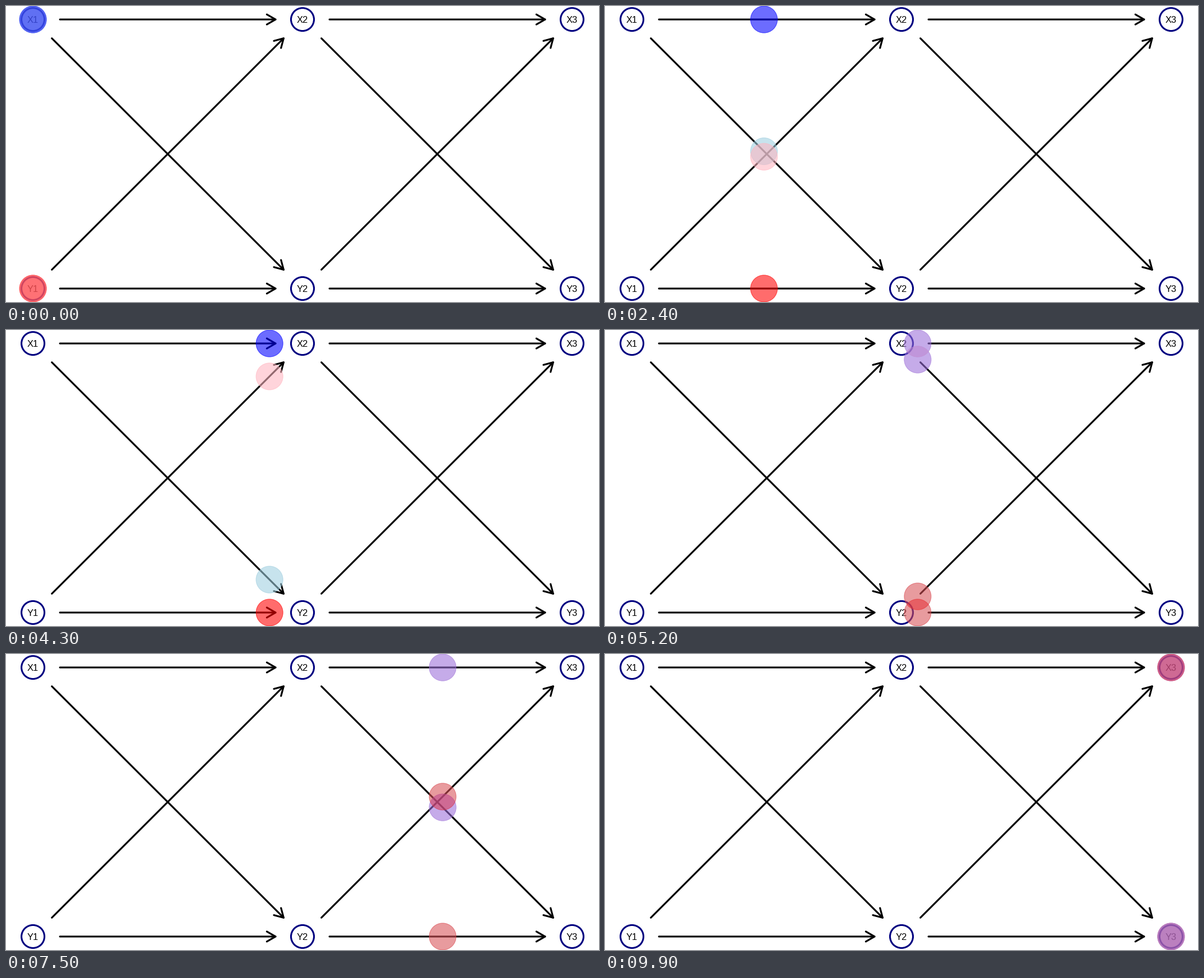
Recreate the animation shown at these times as a matplotlib script. Size 1058x529 px, loop 10 s.

```python
import math

import matplotlib.pyplot as plt
from matplotlib.animation import FuncAnimation
from matplotlib.patches import Circle

W, H = 1058, 529
DPI = 64
FRAMES, INTERVAL = 100, 100
TURN = 49                      # frame at which every ball reaches the middle column
UNIT = W / 2.2
COLS = [0.1 * UNIT, 1.1 * UNIT, 2.1 * UNIT]
ROWS = {"X": 0.05 * UNIT, "Y": 1.05 * UNIT}

plt.rcParams["path.snap"] = False
plt.rcParams["font.family"] = "Liberation Sans"


def pt(px):
    return px * 72 / DPI


fig = plt.figure(figsize=(W / DPI, H / DPI), dpi=DPI, facecolor="white")
ax = fig.add_axes([0, 0, 1, 1])
ax.set_xlim(0, W)
ax.set_ylim(H, 0)
ax.axis("off")


def stroke(points):
    xs, ys = zip(*points)
    ax.plot(xs, ys, color="black", lw=pt(3.2), zorder=1,
            solid_capstyle="round", solid_joinstyle="round")


def arrow(x0, y0, x1, y1, head=18):
    stroke([(x0, y0), (x1, y1)])
    back = math.atan2(y0 - y1, x0 - x1)
    barbs = [(x1 + head * math.cos(back + s * math.pi / 6),
              y1 + head * math.sin(back + s * math.pi / 6)) for s in (-1, 1)]
    stroke([barbs[0], (x1, y1), barbs[1]])


def draw_arrows():
    for left, right in zip(COLS, COLS[1:]):
        for start in "XY":
            for end in "XY":
                gap = UNIT * (0.1 if start == end else 0.07)
                y0, y1 = ROWS[start], ROWS[end]
                dy = 0 if start == end else math.copysign(gap, y1 - y0)
                arrow(left + gap, y0 + dy, right - gap, y1 - dy)


def draw_nodes():
    for row, y in ROWS.items():
        for i, x in enumerate(COLS, 1):
            ax.add_patch(Circle((x, y), 20.5, fc="white", ec="navy",
                                lw=pt(3.1), zorder=2))
            ax.text(x, y + 5.9, f"{row}{i}", fontsize=pt(16.5), color="black",
                    ha="center", va="baseline", zorder=3)


BLUE, RED = "#0000ff", "#ff0000"
SKY, PINK = "#a0cfe0", "#ffb6c1"

# Rows visited by each ball, from the bottom layer to the top one
ROUTES = [
    ("XYX", SKY), ("XXX", BLUE), ("XYY", SKY), ("YYY", RED),
    ("XXY", BLUE), ("YXX", PINK), ("YXY", PINK), ("YYX", RED),
]


def position(route, frame):
    if frame <= TURN:
        leg, t = 0, frame / TURN
    else:
        leg, t = 1, (frame - TURN) / (FRAMES - 1 - TURN)
    y0, y1 = ROWS[route[leg]], ROWS[route[leg + 1]]
    return COLS[leg] + t * UNIT, y0 + t * (y1 - y0)


draw_arrows()
draw_nodes()
balls = [ax.add_patch(Circle(position(route, 0), 24, fc=color, ec=color,
                             lw=pt(1), alpha=0.35, zorder=4))
         for route, color in ROUTES]


def update(frame):
    for ball, (route, _) in zip(balls, ROUTES):
        ball.center = position(route, frame)
    return balls


anim = FuncAnimation(fig, update, frames=FRAMES, interval=INTERVAL,
                     repeat=True, repeat_delay=0, blit=False)
plt.show()
```
